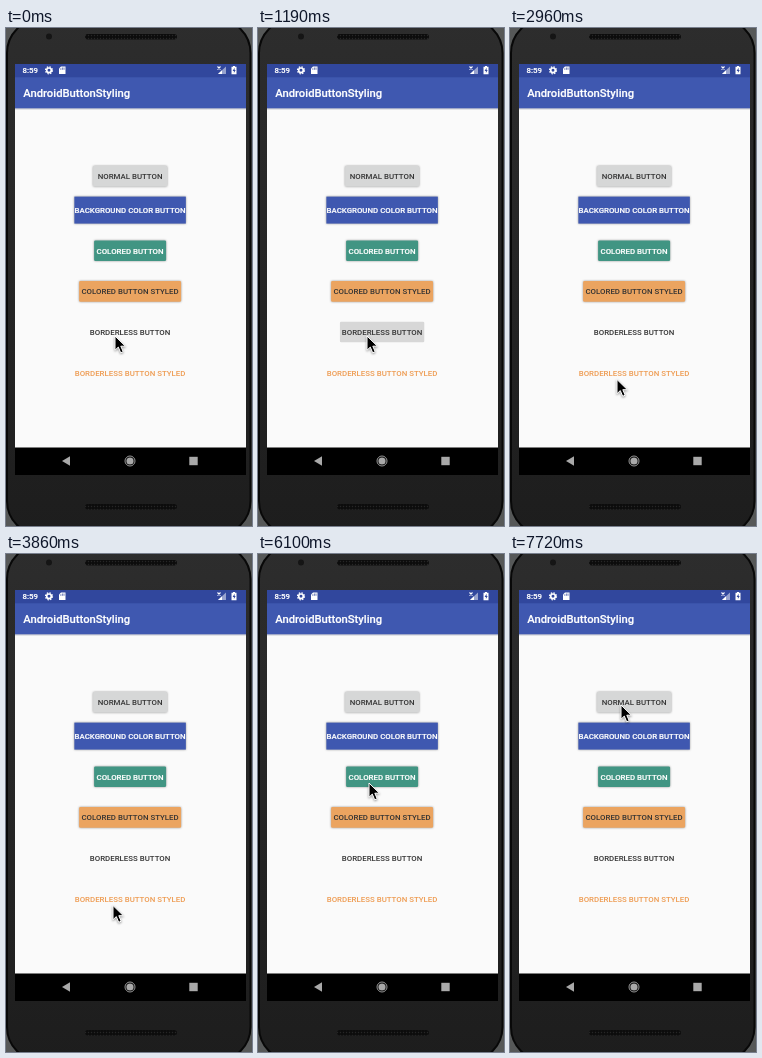
Animation, 246 px wide and 498 px high, one loop 8000 ms. Source, as an HTML page:

```html
<!DOCTYPE html>
<html lang="en">
<head>
<meta charset="utf-8">
<title>Button styling</title>
<style>
  html, body { margin: 0; width: 100%; height: 100%; overflow: hidden; background: #565858; }
  svg { display: block; width: 246px; height: 498px; }
  text { font: 500 7.87px Roboto, sans-serif; }
  text[fill="#fff"] { stroke: #fff; stroke-width: .2px; }
  .label { text-anchor: middle; }
  .raised { filter: drop-shadow(0 .6px .8px #0006); }
  .raised.lifted { filter: drop-shadow(0 1.2px 1.3px #0007); }
</style>
</head>
<body>
<svg viewBox="0 0 246 498">
  <defs>
    <pattern id="mesh" width="3" height="3" patternUnits="userSpaceOnUse">
      <rect width="3" height="3" fill="#0c0c0c"/>
      <circle cx="1.5" cy="1.5" r=".7" fill="#262626"/>
    </pattern>
    <linearGradient id="body" x2="0" y2="1">
      <stop stop-color="#2d2d2d"/>
      <stop offset="1" stop-color="#1d1d1d"/>
    </linearGradient>
  </defs>

  <rect x="1" y="-9" width="243.5" height="516" rx="34" fill="url(#body)" stroke="#080808" stroke-width="2"/>
  <circle cx="43" cy="8.5" r="3" fill="#151515"/>
  <rect x="79" y="6" width="92" height="5.5" rx="2.7" fill="url(#mesh)"/>
  <rect x="79" y="476" width="92" height="5.5" rx="2.7" fill="url(#mesh)"/>

  <rect x="9" y="36" width="231" height="411" fill="#fafafa"/>
  <rect x="9" y="80" width="231" height="1.5" fill="#c9cbd2"/>
  <rect x="9" y="49" width="231" height="31.3" fill="#3f58b0"/>
  <rect x="9" y="36" width="231" height="13.3" fill="#31479d"/>
  <rect x="9" y="419.5" width="231" height="27.5" fill="#000"/>

  <g fill="#fff">
    <text x="16.5" y="45.2" fill="#fff">8:59</text>
    <text x="17.3" y="69" fill="#fff" style="font-size:11.24px">AndroidButtonStyling</text>
    <circle cx="43" cy="42.3" r="2.3" fill="none" stroke="#fff" stroke-width="1.7"/>
    <circle cx="43" cy="42.3" r="3.5" fill="none" stroke="#fff" stroke-width="1.2" stroke-dasharray="1.5 1.25"/>
    <path d="M55 38.5H59.5V46H53V40.5Z"/>
    <path d="M54.8 40.3v1.5M56.4 39.5v2.3M58 39.5v2.3" stroke="#31479d" stroke-width=".7"/>
    <path d="M212 46L220 38.5V46Z" opacity=".5"/>
    <path d="M212 46L216 42.2V46Z"/>
    <path d="M211.5 38.5l3 3m0-3l-3 3" stroke="#fff" stroke-width="1.1"/>
    <path d="M227 38h2v.8h1.5V46.2h-5V38.8H227Z"/>
    <path d="M228.6 39.8l-2 3.1h1.3v2.2l1.8-3.1h-1.1Z" fill="#31479d"/>
  </g>
  <g fill="#a9a9a9">
    <path d="M56 433L64 428.3V437.7Z"/>
    <circle cx="124" cy="433" r="3.6"/>
    <circle cx="124" cy="433" r="5" fill="none" stroke="#a9a9a9" stroke-width=".9"/>
    <rect x="183.3" y="428.8" width="8.4" height="8.4"/>
  </g>

  <g id="buttons"></g>
  <path id="cursor" d="M0 0V14.2L3.3 11.1L5.7 16.8L8.2 15.7L5.8 10.2H10.4Z"
    fill="#000" stroke="#fff" style="filter:drop-shadow(0 1px 1px #0006)"/>
</svg>
<script>
const CENTER = 124.1, PITCH = 40.65, TICK = 148.5;
const DARK = '#333', WHITE = '#fff';
const SHADE = '#00000024', PINK = '#ff408142';

const specs = [
  { label: 'NORMAL BUTTON', width: 74, fill: '#d6d7d7', ink: DARK, ripple: SHADE },
  { label: 'BACKGROUND COLOR BUTTON', width: 111.5, fill: '#3f58b0', ink: WHITE, ripple: SHADE, flat: true },
  { label: 'COLORED BUTTON', width: 72, fill: '#419583', ink: WHITE, ripple: SHADE },
  { label: 'COLORED BUTTON STYLED', width: 102, fill: '#eba460', ink: DARK, ripple: PINK },
  { label: 'BORDERLESS BUTTON', width: 84.4, fill: 'none', ink: DARK, ripple: SHADE },
  { label: 'BORDERLESS BUTTON STYLED', width: 116, fill: 'none', ink: '#ee9b51', ripple: PINK }
];
const [, , COLORED, STYLED, PLAIN, PLAIN_STYLED] = specs;

// Times below count screen refreshes of TICK ms.
const presses = [
  { button: PLAIN, from: 2, to: 4 },
  { button: PLAIN, from: 7, to: 11 },
  { button: PLAIN_STYLED, from: 17, to: 20 },
  { button: PLAIN_STYLED, from: 24, to: 26 },
  { button: STYLED, from: 34, to: 38 },
  { button: COLORED, from: 43, to: 48 }
];
const home = { x: 109, y: 308 };
const moves = [
  { from: 11, to: 14, x: 107, y: 351.5 },
  { from: 26, to: 30, x: 112, y: 263 },
  { from: 38, to: 41, x: 111, y: 229 },
  { from: 48, to: 52, x: 111, y: 151 }
];

const cursor = document.getElementById('cursor');
const buttons = document.getElementById('buttons');
buttons.innerHTML = specs.map(({ label, width, fill, ink, ripple, flat }, i) => {
  const middle = i ? 182.1 + (i - 1) * PITCH : 148.3;
  const height = flat ? 27 : 20.6;
  const box = `x="${CENTER - width / 2}" y="${middle - height / 2}" width="${width}" height="${height}" rx="${flat ? 0 : 1.3}"`;
  return `<g><rect ${box} fill="${fill}" class="${fill === 'none' ? '' : 'raised'}"/>
    <rect ${box} fill="${ripple}" opacity="0"/>
    <text class="label" x="${CENTER}" y="${middle + 2.8}" fill="${ink}">${label}</text></g>`;
}).join('');

const clamp = v => Math.min(1, Math.max(0, v));
const ease = p => p * p * (3 - 2 * p);

function cursorAt(tick) {
  let { x, y } = home;
  for (const move of moves) {
    const p = ease(clamp((tick - move.from) / (move.to - move.from)));
    x += (move.x - x) * p;
    y += (move.y - y) * p;
  }
  return `translate(${x} ${y})`;
}

const start = performance.now();

function draw(now) {
  const t = Math.max(0, now - start) % 8000;
  const tick = Math.floor((t + 15) / TICK);
  cursor.setAttribute('transform', cursorAt(tick));
  const press = presses.find(p => tick >= p.from && tick < p.to);
  specs.forEach((spec, i) => {
    const [face, ripple] = buttons.children[i].children;
    const on = press?.button === spec;
    ripple.setAttribute('opacity', on ? clamp(0.9 + (tick - press.from) * 0.1) : 0);
    face.classList.toggle('lifted', on);
  });
  requestAnimationFrame(draw);
}
draw(start);
</script>
</body>
</html>
```
